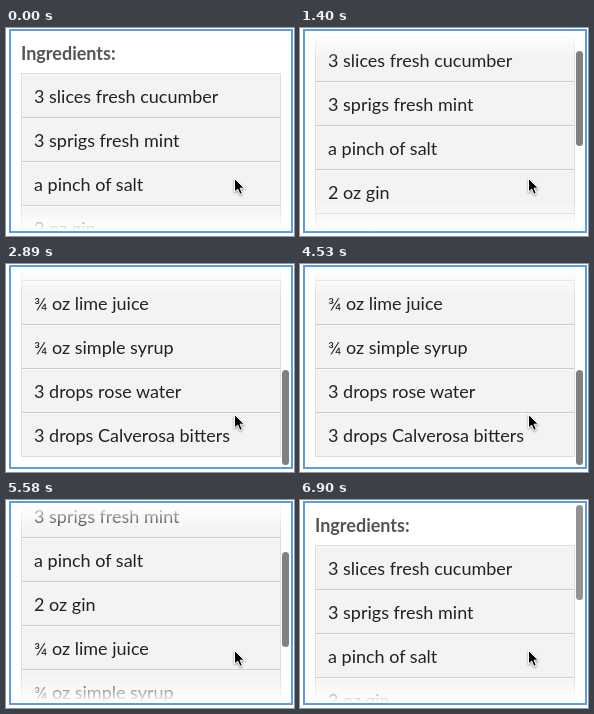
An HTML page for the animation above (6930 ms loop, 288 by 208 pixels).

```html
<!DOCTYPE html>
<html lang="en">
<head>
<meta charset="utf-8">
<title>Ingredients</title>
<style>
  html, body { margin: 0; width: 100%; height: 100%; overflow: hidden; background: #fff; }
  #frame {
    position: absolute; left: 3px; top: 1px; width: 280px; height: 200px;
    border: 2px solid #5a9de4;
  }
  #view { position: absolute; inset: 0; overflow: hidden; }
  #content {
    position: absolute; left: 10px; top: 0; width: 260px;
    font: 18px Lato, sans-serif; color: #222;
  }
  h1 { position: absolute; left: 0; top: 10px; margin: 0; font-size: 18px; line-height: 24px; color: #555; }
  ul {
    position: absolute; top: 42px; width: 258px; margin: 0; padding: 0;
    list-style: none; border: 1px solid #ddd; background: #f4f3f1;
  }
  li {
    height: 43px; padding-left: 12px; line-height: 45px; white-space: nowrap;
    border-bottom: 1px solid #ccc; box-shadow: inset 0 1px #faf9f8;
  }
  li:last-child { border: 0; }
  #bar { position: absolute; left: 271px; top: 2px; width: 7px; height: 95px; border-radius: 4px; background: #808080; }
  svg { position: absolute; left: 226px; top: 148px; filter: drop-shadow(0 1px 1px #0006); }
</style>
</head>
<body>
<div id="frame">
  <div id="view">
    <div id="content">
      <h1>Ingredients:</h1>
      <ul>
        <li>3 slices fresh cucumber</li>
        <li>3 sprigs fresh mint</li>
        <li>a pinch of salt</li>
        <li>2 oz gin</li>
        <li>¾ oz lime juice</li>
        <li>¾ oz simple syrup</li>
        <li>3 drops rose water</li>
        <li>3 drops Calverosa bitters</li>
      </ul>
    </div>
  </div>
  <div id="bar"></div>
</div>
<svg width="16" height="22">
  <path d="M2.5 2.5V16L5.7 13.1L7.9 18.3L10.3 17.3L8.1 12.2H12.3Z" fill="#000" stroke="#fff"/>
</svg>
<script>
  const LOOP = 6930, MAX = 205, TRAVEL = 101, FADE = 28;
  const [view, content, bar] = ['view', 'content', 'bar'].map(id => document.getElementById(id));
  const clamp = (x, lo, hi) => Math.min(hi, Math.max(lo, x));

  // distance covered by a steadily accelerating swipe
  const swipe = (ms, speed, gain) => {
    const s = Math.max(0, ms / 1000);
    return clamp(speed * s + gain * s * s, 0, MAX);
  };
  const scrollAt = t => Math.round(swipe(t - 810, 45.5, 25.5) - swipe(t - 4530, 89.9, 12.95));

  function barAlpha(t) {
    if (t < 830) return 0;
    if (t < 3460) return 1;
    if (t < 4530) return clamp((3570 - t) / 130, 0, 1);
    return t < 6900 ? 1 : 0.85;
  }

  function draw(t) {
    const y = scrollAt(t);
    const top = 1 - clamp(y / 30, 0, 1), bottom = 1 - clamp((MAX - y) / 30, 0, 1);
    content.style.transform = `translateY(${-y}px)`;
    view.style.maskImage = view.style.webkitMaskImage =
      `linear-gradient(rgba(0,0,0,${top}), #000 ${FADE}px, #000 ${200 - FADE}px, rgba(0,0,0,${bottom}))`;
    bar.style.transform = `translateY(${Math.round(y / MAX * TRAVEL)}px)`;
    bar.style.opacity = barAlpha(t);
  }

  const start = performance.now();
  function tick() {
    draw((performance.now() - start) % LOOP);
    requestAnimationFrame(tick);
  }
  tick();
</script>
</body>
</html>
```
